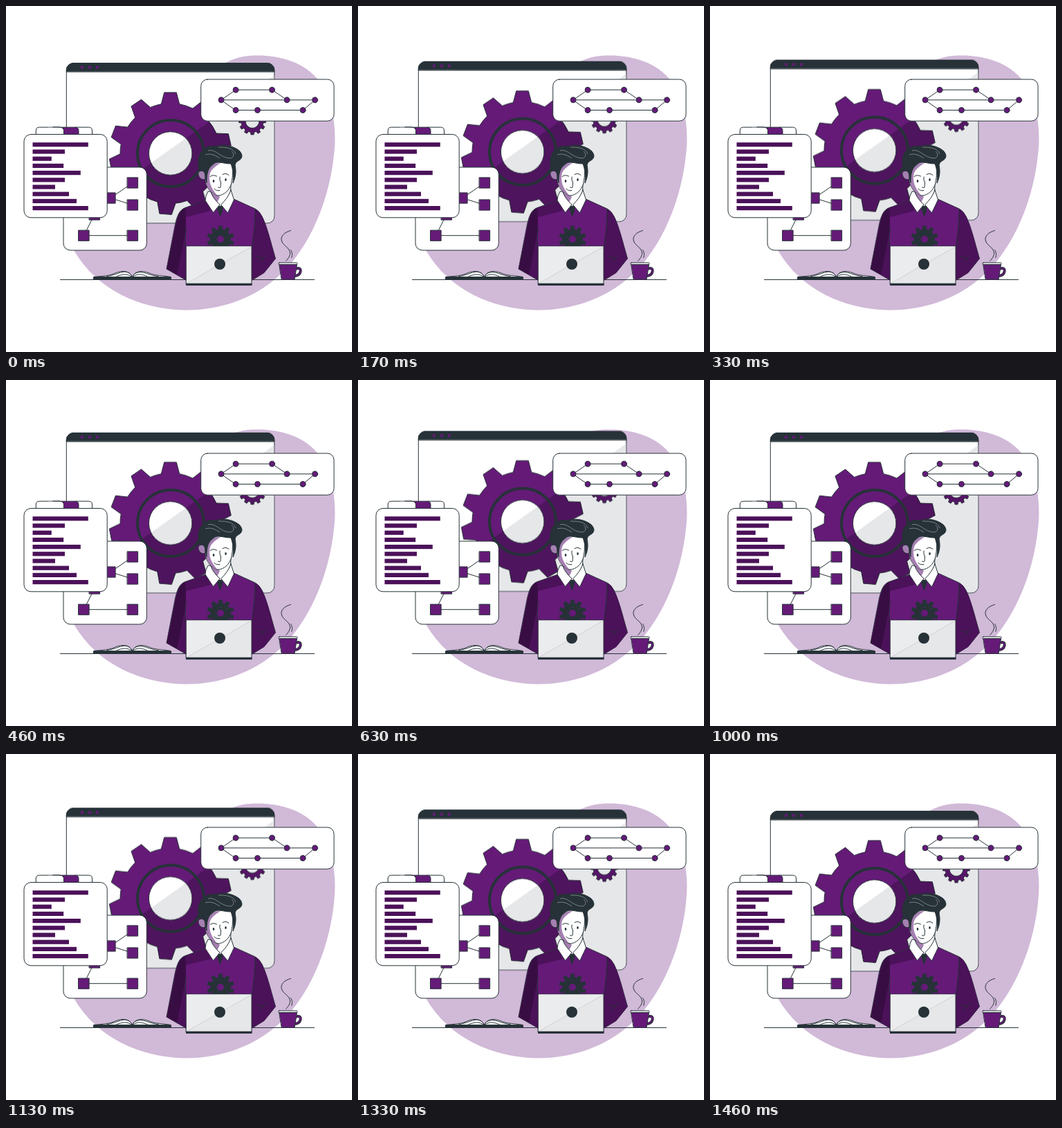
These frames come from a looping animation (500x500 px, 1500 ms). An HTML page:

```html
<!DOCTYPE html>
<html lang="en">
<head>
<meta charset="utf-8">
<title>Developer at work</title>
<style>
html, body { margin: 0; width: 100%; height: 100%; overflow: hidden; background: #fff; }
svg { display: block; width: 100vw; height: 100vh; }
.o { stroke: #263238; stroke-width: 1; stroke-linejoin: round; stroke-linecap: round; }
.w { fill: #fff; }
.p { fill: #651a78; }
.d { fill: #4b1159; }
.k { fill: #263238; }
.g { fill: #e6e7e9; }
.n { fill: none; }
</style>
</head>
<body>
<svg viewBox="0 0 500 500">
  <defs>
    <clipPath id="low"><path d="M87 314L388 100V314Z"/></clipPath>
  </defs>

  <path fill="#d1b9d8" d="M310 86C332 73 347 71.500 363 71.500C398 71.500 432 82 452 108C470 132 477 168 475 203C471 262 450 326 411 373C373 417 318 440 258 439.500C194 438 132 411 98 353L100 290L210 180Z"/>

  <g id="win">
    <rect class="w o" x="87.300" y="82.600" width="300.500" height="231.200" rx="10"/>
    <path class="g" d="M90 312L387.300 100.500V304a9.500 9.500 0 0 1-9.500 9.300H96Q92 313 90 312Z"/>
    <path class="k o" d="M87.300 94.800V92.600a10 10 0 0 1 10-10h280.500a10 10 0 0 1 10 10v2.200Z"/>
    <g class="p"><circle cx="110" cy="88.800" r="2.300"/><circle cx="121" cy="88.800" r="2.300"/><circle cx="132" cy="88.800" r="2.300"/></g>
    <path id="big" class="p o"/>
    <path id="bigShade" clip-path="url(#low)" opacity=".22"/>
    <circle class="n" cx="238" cy="213" r="48" stroke="#263238" stroke-width="4"/>
    <circle class="w" cx="237.700" cy="213" r="31.300"/>
    <circle class="g" cx="237.700" cy="213" r="31.300" clip-path="url(#low)"/>
    <circle class="n o" cx="237.700" cy="213" r="31.300"/>
    <path id="small" class="o" fill="#561567"/>
    <circle class="g o" cx="356" cy="166.500" r="10"/>
  </g>

  <g id="graph"><rect class="w o" x="281.700" y="106" width="192.300" height="60.200" rx="9.500"/>
    <path class="n o" d="M311 135.800L332 121.200H384.500L406 135.800M311 135.800H446.500L429 150.500H332Z"/></g>

  <g id="tree"><rect class="w o" x="83" y="233" width="120.300" height="120" rx="10"/>
    <path class="n o" d="M183 255.500L151 277.500L183 287.500M128 301L112.500 331.700H183"/></g>

  <path class="w o" d="M43.300 186V180q0-4.800 5-4.800H78V186ZM100 186V175.200h19.500q5 0 5 4.800v6Z"/>
  <path class="p o" d="M68 175.200H100q5 0 5 5V186H83.500V181q0-5.800-6-5.800Z"/>
  <path class="w" d="M60 175.700H77q5.500 .5 5.500 5V186H60Z"/>
  <rect class="w o" x="26" y="185.500" width="120.200" height="120.300" rx="10"/>
  <g id="bars" class="d"></g>

  <path class="o" d="M78.500 395.500H445.500"/>

  <g id="book">
    <path class="k" d="M126 392H239V395.800H126Z"/>
    <path class="w o" d="M127 391.500C142 390 150 390 158 386C168 382 178 382 182.500 391.500C187 382 197 382 207 386C215 390 224 389 238 391.500Z"/>
    <path class="n o" d="M146 390.500C157 389 161 386 168 384.500C175 383 180 386 182.500 391.500C185 386 190 384 197 385C205 386 210 390 220 390.500M160 390.500C168 388 174 386 182.500 391.500C190 386 197 388 204 390.500"/>
  </g>

  <g id="mug">
    <path class="n" d="M419 379.500Q426.500 377.500 425.500 384Q424 389.500 417.500 390" stroke="#263238" stroke-width="4"/>
    <path class="n" d="M419 379.500Q426.500 377.500 425.500 384Q424 389.500 417.500 390" stroke="#651a78" stroke-width="2"/>
    <path class="p o" d="M395 373.500H420.500L417 395.300H398.500Z"/>
    <rect class="w o" x="394" y="371" width="27" height="2.600" rx="1"/>
    <path class="n o" d="M411.500 324.500C402 327 396 333 398.500 340C401 347 410 349 410.500 357C410.500 362 407.500 365 404.500 368.500M411.500 352.500C414 356 414 360 412.800 363.500"/>
  </g>

  <g id="man">
    <path class="p o" d="M289 281L259 291.500C250 295 247 304 244 318L232 380L260 396H356L373 385.500L389.500 365C382 339 377 318 370 304Q366 296 360 293L327 278Z"/>
    <path class="d" d="M289 281.500L259 292C251 295 248 304 245 318L232.500 380L260 395.500V305L296 296Z"/>
    <path fill="#380d43" d="M259 292C251 295 248 304 245 318L232.500 380L247 388Q256 345 260 320Z"/>
    <path class="d" d="M360 293.500Q366 296 370 304C377 318 382 339 389 365L373 385.500L355 395.500V347Q359 320 360 293.500Z"/>
    <path class="n o" d="M260 320L259 347M360 293.500Q360 320 356 347M362 362L373 365M366 370L376 360"/>
    <path id="badge" class="k"/>
    <circle class="p" cx="310" cy="337" r="5"/>

    <path class="w o" d="M297 260L294 282L309 291L324 281L325 257Z"/>
    <path fill="#a57fb1" d="M297 264L295 280L304 286L309 276Z"/>
    <path class="k" d="M304 287L309.500 289L314 287L312.500 297L309.500 305L306.500 297Z"/>
    <path class="w o" d="M292 268Q288 274 288 281L299.500 298.500L309 287Q299 278 296 269ZM325 266L329.500 280L320.500 299L310.500 287Q320 279 325 266Z"/>

    <path fill="#a57fb1" class="o" d="M288 241C283 236 277 238 278 243.500C279 249 284 253 289 249.500Z"/>
    <path class="w o" d="M288 226V252C289 262 297 272 306 274C315 274 323 266 325.500 257C328 246 328.500 234 327 221Z"/>
    <path fill="#a57fb1" d="M288.500 228V252C289 262 297 271 305 273.500C298 265 294 258 294 248C294 238 299 234 310 227Z"/>
    <path class="k o" d="M290 255C287 249 289 244 286 239Q282 236 280 239C277 229 276 215 286 207C294 200 302 204 309 201.500C320 200 331 204 337 209C343 215 342 221 335 224Q331 226.500 331 230C333 239 332 247 328 256C329 245 328 236 325 228C314 228 305 223 299 229C292 234 290 241 290 255Z"/>
    <path class="n" stroke="#8d9498" stroke-width=".8" d="M292 209C303 206 309 219 323 220C329 220 331 214 326 210M307 204C318 204 329 205 332 214M288 215C297 212 304 217 309 220"/>
    <path class="n o" stroke-width="1.400" d="M295 246.500Q299 243 304.500 246M313 243.500Q318 240.500 322 244.500"/>
    <path class="n o" d="M309 247Q308 251 310.500 255L310 262Q308.500 263.500 306.500 262M301 264Q304 268 309 266.500"/>
    <ellipse class="k" cx="300" cy="253" rx="1.300" ry="1.900"/>
    <ellipse class="k" cx="317.500" cy="251" rx="1.300" ry="1.900"/>
  </g>

  <g id="laptop">
    <rect class="g o" x="260.500" y="347" width="94.500" height="55"/>
    <path fill="#ebeced" d="M261 347.500H354.500L261 401Z"/>
    <path d="M261 401L354.500 348" stroke="#c4c6c8" stroke-width=".7"/>
    <rect class="k" x="260" y="400.700" width="95.500" height="3.300"/>
    <circle class="k" cx="309" cy="373" r="8"/>
  </g>
</svg>
<script>
const $ = id => document.getElementById(id);

function add(parent, tag, attrs) {
  const el = document.createElementNS('http://www.w3.org/2000/svg', tag);
  for (const k in attrs) el.setAttribute(k, attrs[k]);
  parent.append(el);
}

// Gear outline: teeth at the given angles (degrees, clockwise from the top).
function gear(cx, cy, root, tip, angles, base, top) {
  const at = (r, a) => {
    const q = a * Math.PI / 180;
    return (cx + r * Math.sin(q)).toFixed(2) + ' ' + (cy - r * Math.cos(q)).toFixed(2);
  };
  return angles.map((a, i) =>
    (i ? `A${root} ${root} 0 0 1 ` : 'M') + at(root, a - base) +
    'L' + at(tip, a - top) + 'L' + at(tip, a + top) + 'L' + at(root, a + base)
  ).join('') + `A${root} ${root} 0 0 1 ${at(root, angles[0] - base)}Z`;
}
const even = n => Array.from({ length: n }, (_, i) => i * 360 / n);

const bigPath = gear(237.5, 213, 72.5, 88.5, [0, 37, 77, 114, 150, 184.5, 222, 259, 291, 326], 10.5, 5.7);
$('big').setAttribute('d', bigPath);
$('bigShade').setAttribute('d', bigPath);
$('small').setAttribute('d', gear(356, 166.5, 16, 19.5, even(12), 9, 6));
$('badge').setAttribute('d', gear(310, 337, 15, 19.8, even(10), 11, 8));

[[332, 121.2], [384.5, 121.2], [311, 135.8], [406, 135.8], [446.5, 135.8], [332, 150.5], [363.5, 150.5], [429, 150.5]]
  .forEach(([cx, cy]) => add($('graph'), 'circle', { cx, cy, r: 4, class: 'p o' }));

[[183, 255.5], [183, 287.5], [150.5, 277.5], [128, 301.5], [112.5, 331.7], [183, 331.7]]
  .forEach(([x, y]) => add($('tree'), 'rect', { x: x - 7.6, y: y - 7.6, width: 15.2, height: 15.2, class: 'p o' }));

[80.3, 46.5, 27.3, 44.7, 69.3, 46.5, 32.5, 52.5, 63.5, 80.3]
  .forEach((width, i) => add($('bars'), 'rect', { x: 38.5, y: 197.2 + i * 10.2, width, height: 6.2 }));

// The window floats up and down at constant speed.
const move = y => ({ transform: `translateY(${y}px)` });
$('win').animate([move(0.27), move(-9.73), move(0.27)], { duration: 1500, delay: -20, iterations: Infinity });
</script>
</body>
</html>
```
